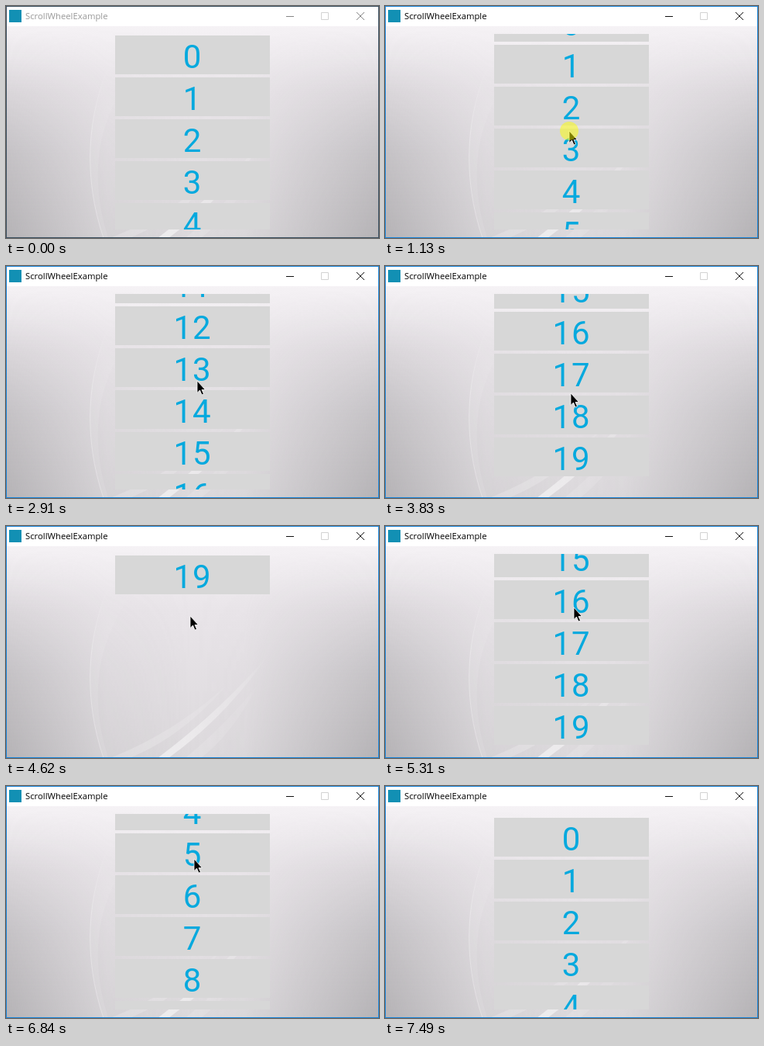
Recreate the animation shown at these times as an HTML page. Size 482 by 299 pixels, loop 7540 ms.

```html
<!DOCTYPE html>
<html lang="en">
<head>
<meta charset="utf-8">
<title>ScrollWheelExample</title>
<style>
  html, body { margin: 0; width: 100%; height: 100%; overflow: hidden; background: #fff; }
  svg { display: block; width: 482px; height: 299px; }
  .title { font: 11.3px "Open Sans", "Noto Sans", sans-serif; }
  .row text { font: 42px Roboto, sans-serif; letter-spacing: 1px; fill: #04a9de; text-anchor: middle; }
</style>
</head>
<body>
<svg viewBox="0 0 482 299">
  <defs>
    <linearGradient id="base" x2="0" y2="1">
      <stop offset="0" stop-color="#f5f2f5"/>
      <stop offset=".3" stop-color="#e9e5e9"/>
      <stop offset="1" stop-color="#dcd9dc"/>
    </linearGradient>
    <linearGradient id="sideTone" x2="0" y2="1">
      <stop offset="0" stop-color="#a09ea1" stop-opacity="0"/>
      <stop offset=".15" stop-color="#a09ea1" stop-opacity=".07"/>
      <stop offset=".6" stop-color="#a09ea1" stop-opacity=".46"/>
      <stop offset="1" stop-color="#a09ea1" stop-opacity=".65"/>
    </linearGradient>
    <linearGradient id="sideFade">
      <stop offset="0" stop-color="#fff"/>
      <stop offset=".27" stop-color="#fff" stop-opacity=".18"/>
      <stop offset=".5" stop-color="#fff" stop-opacity="0"/>
      <stop offset=".64" stop-color="#fff" stop-opacity=".05"/>
      <stop offset=".82" stop-color="#fff" stop-opacity=".53"/>
      <stop offset="1" stop-color="#fff"/>
    </linearGradient>
    <linearGradient id="streak" gradientUnits="userSpaceOnUse" x1="200" y1="298" x2="340" y2="165">
      <stop offset="0" stop-color="#fff" stop-opacity=".55"/>
      <stop offset="1" stop-color="#fff" stop-opacity="0"/>
    </linearGradient>
    <linearGradient id="arc" gradientUnits="userSpaceOnUse" x1="0" y1="75" x2="0" y2="298">
      <stop offset="0" stop-color="#fff" stop-opacity="0"/>
      <stop offset=".4" stop-color="#fff" stop-opacity=".3"/>
      <stop offset="1" stop-color="#fff" stop-opacity=".3"/>
    </linearGradient>
    <mask id="sides"><rect width="482" height="299" fill="url(#sideFade)"/></mask>
    <clipPath id="content"><rect x="1" y="26" width="480" height="272"/></clipPath>
    <clipPath id="viewport"><rect x="141" y="36" width="200" height="252"/></clipPath>
  </defs>

  <g clip-path="url(#content)">
    <rect y="26" width="482" height="273" fill="url(#base)"/>
    <rect y="26" width="482" height="273" fill="url(#sideTone)" mask="url(#sides)"/>
    <path d="M134 75C105 140 99 220 126 299H132C109 225 112 150 172 75Z" fill="url(#arc)" opacity=".3"/>
    <path d="M134 75C105 140 99 220 126 299" fill="none" stroke="url(#arc)"/>
    <g fill="url(#streak)">
      <path d="M196 299Q275 240 340 165Q285 245 210 299Z"/>
      <path d="M232 299Q285 255 325 205Q295 265 252 299Z" opacity=".3"/>
      <path d="M135 299Q220 265 285 205Q230 270 160 299Z" opacity=".35"/>
    </g>
  </g>

  <g id="rows" clip-path="url(#viewport)"></g>

  <rect width="482" height="26" fill="#fff"/>
  <rect x="4" y="5" width="16" height="16" fill="#1290b4"/>
  <text id="title" class="title" x="25" y="17">ScrollWheelExample</text>
  <path d="M407.5 8.5h9v9h-9z" fill="none" stroke="#d2d2d2"/>
  <path id="buttons" d="M362 13.5h10M453 8l10 10M463 8l-10 10" fill="none"/>
  <rect id="border" x=".5" y=".5" width="481" height="298" fill="none"/>

  <g id="cursor">
    <path d="M0 -1V14.5L3.5 11L6 17L8.5 16L6 10.5H10.5Z" stroke="#fff" stroke-width=".8"/>
    <circle id="press" cy="-1" r="12" fill="#ff0" fill-opacity=".5"/>
  </g>
</svg>
<script>
const LOOP = 7540, PITCH = 54, ROWS = 20, END = (ROWS - 1) * PITCH;
const ENTER = 130, ARRIVE = 690, RETURN = 350;
const SLOP = 16, FRICTION = 100, MOMENTUM = 82, BOUNCE = 150;

// Each flick: press time, release time, pointer y at press and at release
const flicks = [
  [870, 1254, 220, 36], [1480, 1706, 220, 28], [2150, 2710, 223, 44],
  [3300, 3575, 216, 42], [3970, 4270, 192, 37],
  [4770, 5070, 117, 285], [5380, 5730, 80, 219], [5920, 6173, 86, 250],
  [6450, 6680, 85, 280], [6880, 7080, 75, 290]
].map(([press, release, from, to]) => ({ press, release, from, to }));
const first = flicks[0], last = flicks[flicks.length - 1];

const $ = id => document.getElementById(id);
const clamp = (v, lo, hi) => Math.min(hi, Math.max(lo, v));
const lerp = (a, b, u) => a + (b - a) * u;
const smooth = u => u * u * (3 - 2 * u);
const progress = (t, a, b) => clamp((t - a) / (b - a), 0, 1);

const dragY = (f, t) => lerp(f.from, f.to, progress(t, f.press, f.release) ** 3);
const driftX = t => 242.5 - 5 * Math.cos((t - 900) * Math.PI / 1720);

function pointerAt(t) {
  if (t < first.press) {
    const u = smooth(progress(t, ENTER, ARRIVE));
    return [lerp(357, driftX(first.press), u), lerp(286, first.from, u)];
  }
  const i = flicks.findLastIndex(f => f.press <= t), f = flicks[i], next = flicks[i + 1];
  if (t < f.release || !next) return [driftX(t), dragY(f, t)];
  const back = Math.min(RETURN, next.press - f.release);
  return [driftX(t), lerp(f.to, next.from, smooth(progress(t, f.release, f.release + back)))];
}

// Drag past the slop, then coast with friction until the next press
function scrollAt(t) {
  let offset = 0;
  flicks.forEach((f, i) => {
    if (t < f.press) return;
    const until = Math.min(t, i + 1 < flicks.length ? flicks[i + 1].press : LOOP);
    const moved = f.from - dragY(f, until);
    offset += Math.sign(moved) * Math.max(0, Math.abs(moved) - SLOP);
    const coasting = until - f.release;
    if (coasting <= 0) return;
    const speed = (f.from - f.to) / (f.release - f.press);
    offset += MOMENTUM * speed * (1 - Math.exp(-coasting / FRICTION));
    const inside = clamp(offset, 0, END);
    offset = lerp(inside, offset, Math.exp(-coasting / BOUNCE));
  });
  return offset;
}

$('rows').innerHTML = Array.from({ length: ROWS }, (_, i) =>
  `<g class="row"><rect width="200" height="50" fill="#d7d7d7"/><text x="100" y="42">${i}</text></g>`).join('');
const rows = [...$('rows').children];

function draw(t) {
  const offset = Math.round(scrollAt(t));
  rows.forEach((row, i) => row.setAttribute('transform', `translate(141 ${38 + i * PITCH - offset})`));

  const active = t >= first.press;
  $('title').setAttribute('fill', active ? '#000' : '#999');
  $('buttons').setAttribute('stroke', active ? '#111' : '#858585');
  $('border').setAttribute('stroke', active ? '#1883d7' : '#3b5060');

  const [x, y] = pointerAt(t).map(Math.round);
  $('cursor').setAttribute('transform', `translate(${x} ${y})`);
  $('cursor').style.display = t >= ENTER && t < last.release ? '' : 'none';
  $('press').style.display = flicks.some(f => t >= f.press && t < f.release) ? '' : 'none';
}

const start = performance.now();
function tick() {
  draw((performance.now() - start) % LOOP);
  requestAnimationFrame(tick);
}
draw(0);
requestAnimationFrame(tick);
</script>
</body>
</html>
```
